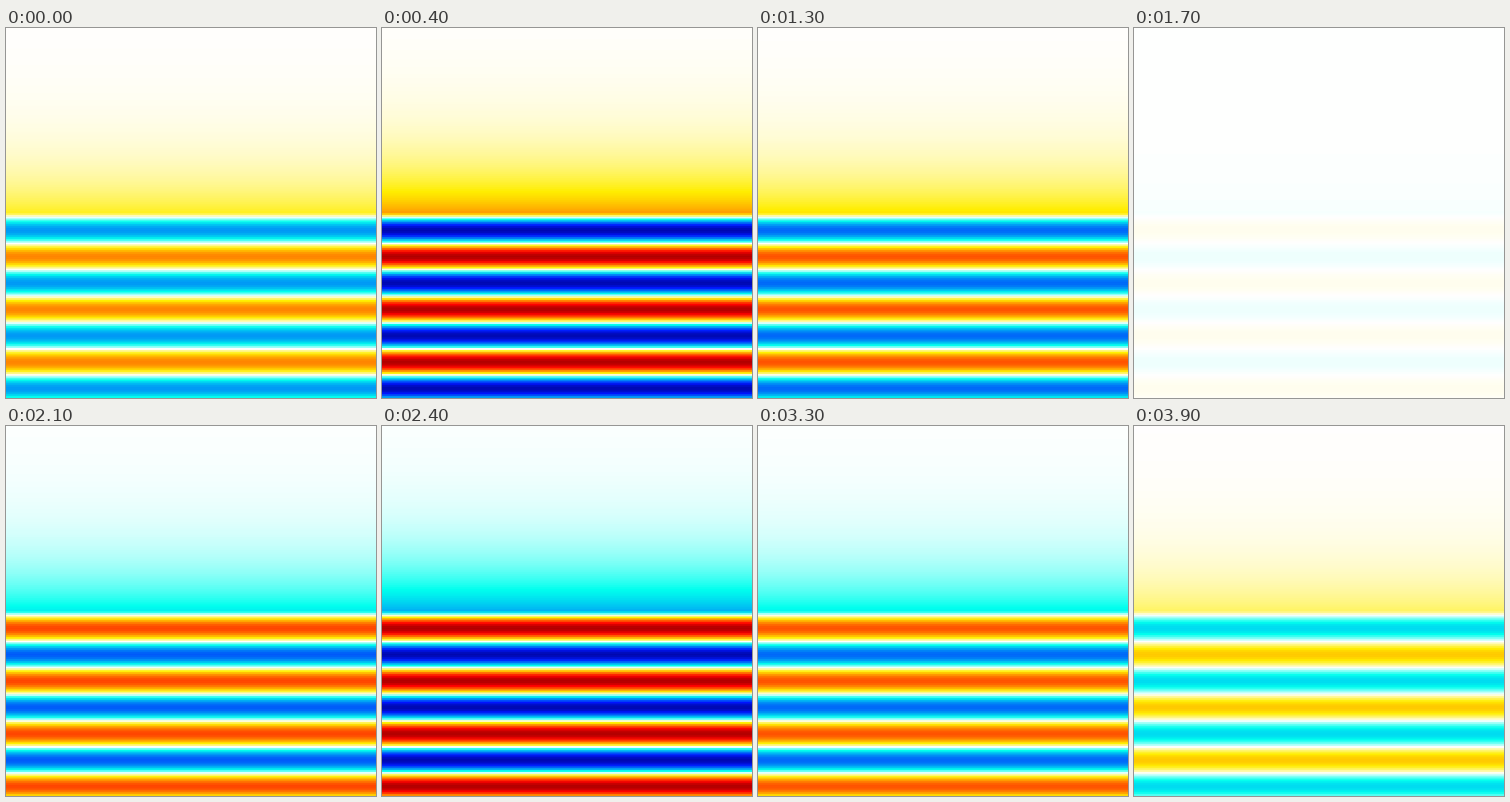
A matplotlib script for the animation above (4000 ms loop, 400 px wide and 400 px high).

```python
import numpy as np
import matplotlib.pyplot as plt
from matplotlib.animation import FuncAnimation
from matplotlib.colors import LinearSegmentedColormap

SIZE = 400
CELL = 2
FRAMES = 40
SURFACE = SIZE / 2       # boundary between the two media
WAVELENGTH = 57
DECAY = 44               # depth scale of the evanescent field
PHASE = np.radians(62)   # phase shift of the reflected wave


def half_map(pale, full, dark):
    """Stops from white outwards, as (strength, colour)."""
    return [(0.25, pale), (0.75, full), (1, dark)]


negative = half_map("#00ffee", "#0018ff", "#000080")
positive = half_map("#ffee00", "#ff0000", "#800000")
stops = [((1 - s) / 2, c) for s, c in reversed(negative)]
stops += [(0.5, "white")]
stops += [((1 + s) / 2, c) for s, c in positive]
wave_map = LinearSegmentedColormap.from_list("wave", stops, N=1024)

y = np.arange(CELL / 2, SIZE, CELL)
depth = y - SURFACE
standing = np.cos(2 * np.pi * depth / WAVELENGTH + PHASE)
evanescent = np.cos(PHASE) * np.exp(-np.abs(depth) / DECAY)
profile = np.where(depth < 0, evanescent, standing)[:, None]


def field(frame):
    return profile * np.cos(2 * np.pi * frame / FRAMES - PHASE)


fig = plt.figure(figsize=(4, 4), dpi=100)
ax = fig.add_axes([0, 0, 1, 1])
ax.axis("off")
image = ax.imshow(field(0), cmap=wave_map, vmin=-1, vmax=1, aspect="auto",
                  interpolation="nearest", extent=(0, SIZE, SIZE, 0))


def update(frame):
    image.set_data(field(frame))
    return [image]


anim = FuncAnimation(fig, update, frames=FRAMES, interval=100, repeat=True)
plt.show()
```
